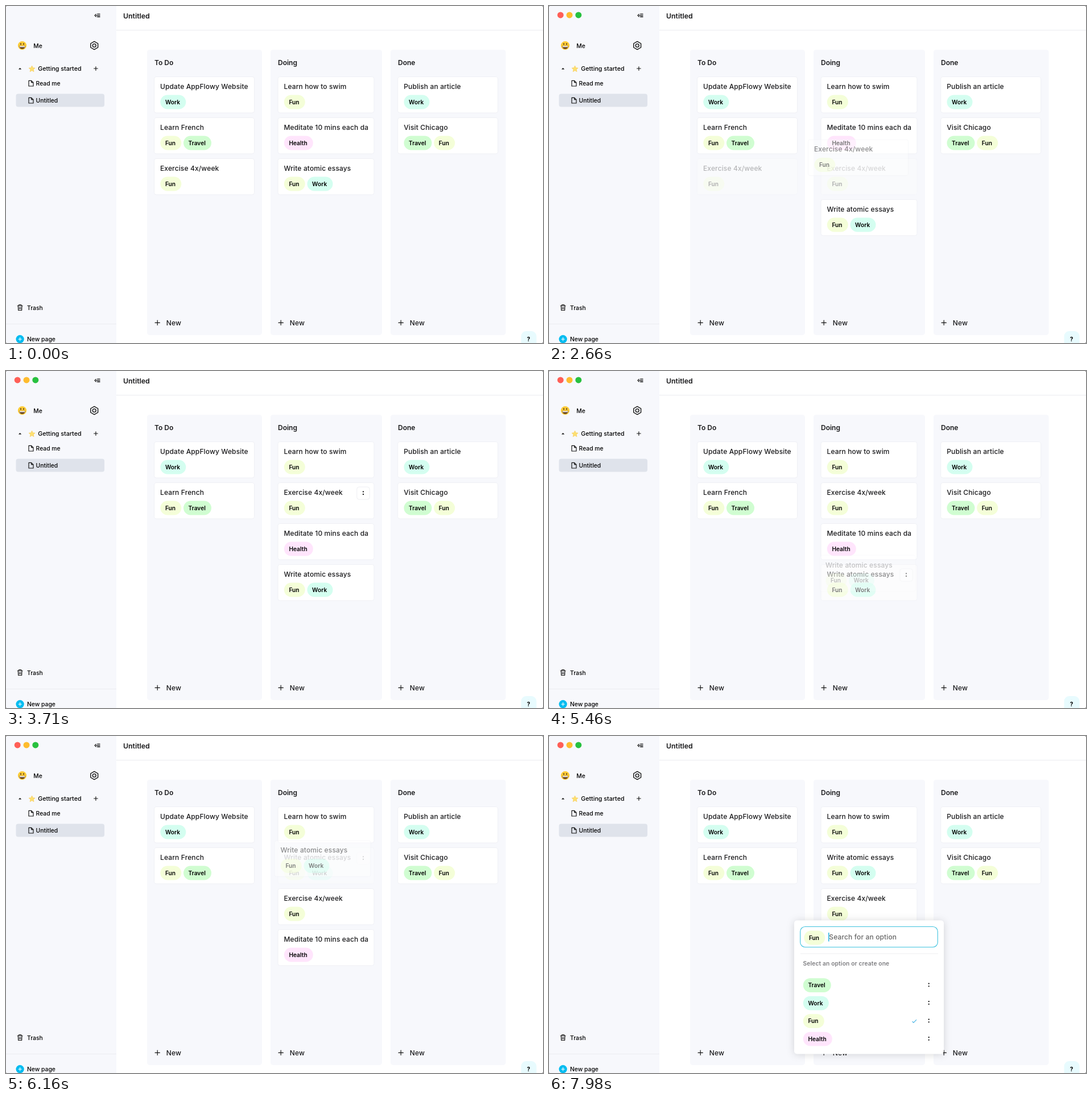
Animation of 944 by 593 pixels, one loop 8000 ms. Source, as an HTML page:

```html
<!DOCTYPE html>
<html lang="en">
<head>
<meta charset="utf-8">
<title>Board</title>
<style>
  html, body { margin: 0; width: 100%; height: 100%; overflow: hidden; background: #777; }
  svg { display: block; }
  text { font: 500 12px Inter, "Open Sans", sans-serif; letter-spacing: .13px; fill: #1a1a1c; white-space: pre; }
  .head { font-weight: 600; letter-spacing: 0; }
  .side { font-size: 10.35px; letter-spacing: 0; fill: #000; }
  .tag { font-size: 10.2px; font-weight: 600; letter-spacing: 0; fill: #000; }
  .line { fill: none; stroke: #111; stroke-width: 1.15; stroke-linecap: round; stroke-linejoin: round; }
  .popup { filter: drop-shadow(0 1px 7px rgba(0, 0, 0, .15)); }
</style>
</head>
<body>
<svg id="stage" width="944" height="593" viewBox="0 0 944 593">
  <rect width="944" height="593" rx="2.5" fill="#fff"/>
  <path d="M194 0H2.5A2.5 2.5 0 0 0 0 2.5V590.5A2.5 2.5 0 0 0 2.5 593H194Z" fill="#f7f8fc"/>
  <path d="M194 42.5H944M0 559.5H194" stroke="#ebecf0"/>

  <path class="line" style="stroke-width:1.3" d="M158.2 14.4L156 16.6L158.2 18.8M160.6 14.2H165M158.5 16.6H165M160.6 19H165"/>
  <circle cx="28.5" cy="69.5" r="7.6" fill="#fccb35"/>
  <path d="M23 70.3H34A5.5 5.3 0 0 1 23 70.3Z" fill="#5b3a1e"/>
  <path d="M23.7 70.5H33.3V72.4H23.7Z" fill="#fff"/>
  <ellipse cx="26" cy="66.8" rx="1" ry="1.6" fill="#5b3a1e"/>
  <ellipse cx="31" cy="66.8" rx="1" ry="1.6" fill="#5b3a1e"/>
  <path class="line" style="stroke-width:1.4" d="M155.2 62.4L161.6 66V73L155.2 76.6L148.8 73V66Z"/>
  <circle class="line" style="stroke-width:1.4" cx="155.2" cy="69.5" r="2.9"/>
  <path d="M22 111.4L24.6 108.8L27.2 111.4Z" fill="#111"/>
  <path id="star" fill="#fde070" stroke="#f7c648" stroke-width=".6" stroke-linejoin="round"/>
  <path class="line" d="M154.6 110H161.2M157.9 106.7V113.3"/>
  <rect x="17.5" y="154.5" width="155.5" height="23" rx="4" fill="#dfe3eb"/>
  <g class="line">
    <path id="doc" d="M44.6 131.3H40V141H48V134.6ZM44.6 131.3V134.6H48"/>
    <use href="#doc" y="30"/>
    <path d="M20.3 527.5H29M22.7 527.3V525.5H26.6V527.3M21.3 527.7L21.7 535.5H27.6L28 527.7M23.5 530V533.2M25.8 530V533.2"/>
  </g>
  <circle cx="24.6" cy="586.2" r="7.1" fill="#00bcf0"/>
  <path d="M21.4 586.2H27.8M24.6 583V589.4" stroke="#fff" stroke-width="1.1"/>

  <text class="head" x="206" y="22" style="font-size:12.3px">Untitled</text>
  <text class="side" x="48.3" y="73.7">Me</text>
  <text class="side" x="56.2" y="114.2" style="font-size:10.7px">Getting started</text>
  <text class="side" x="52.6" y="140.2">Read me</text>
  <text class="side" x="52.6" y="170.3">Untitled</text>
  <text class="side" x="37" y="534.8">Trash</text>
  <text class="side" x="37" y="590.4">New page</text>

  <rect x="905.5" y="572" width="27" height="30" rx="9" fill="#e8fbfe"/>
  <text class="tag" x="918.7" y="589.6" text-anchor="middle" style="font-weight:700">?</text>
  <g id="scene"></g>
</svg>
<script>
const $ = id => document.getElementById(id);
const STEP = 70, LOOP = 8000, SLOT = 72, TOP = 120.5;

const tags = {
  Travel: [49, '#d0fdd1'], Work: [45, '#d4fef0'],
  Fun: [37, '#f4fed8'], Health: [51, '#ffe5fc']
};
const cards = {
  site: ['Update AppFlowy Website', 'Work'],
  french: ['Learn French', 'Fun', 'Travel'],
  exercise: ['Exercise 4x/week', 'Fun'],
  swim: ['Learn how to swim', 'Fun'],
  meditate: ['Meditate 10 mins each day', 'Health'],
  essays: ['Write atomic essays', 'Fun', 'Work'],
  article: ['Publish an article', 'Work'],
  visit: ['Visit Chicago', 'Travel', 'Fun']
};
const columns = [['To Do', 248, 202, 260.5, 176], ['Doing', 465, 196, 478, 169], ['Done', 676, 202.5, 688.7, 176]];

// [time, card under the pointer, immediate]
const hovers = [
  [0, ''], [1400, 'exercise', true], [2100, '', true], [3640, 'exercise'], [4060, 'meditate'],
  [4480, 'essays'], [6650, 'exercise'], [7070, 'essays'], [7210, 'exercise'], [7910, '']
];
const exercisePath = [[2170, 260.5, 268.5], [2310, 268, 267], [2660, 455.5, 235], [3010, 460, 228], [3430, 460, 160]];
const essaysPath = [[5390, 478, 340.5], [5530, 473, 308], [5670, 465.5, 226], [5810, 466, 206], [6160, 472, 184]];

const ramp = (t, a, b) => Math.max(0, Math.min(1, (t - a) / (b - a)));
const fade = (t, at) => ramp(t, at - STEP, at + STEP);

function along(path, t) {
  let [, x, y] = path[0];
  for (let i = 1; i < path.length; i++) {
    const [t0, x0, y0] = path[i - 1], [t1, x1, y1] = path[i], k = ramp(t, t0, t1);
    if (t > t0) { x = x0 + (x1 - x0) * k; y = y0 + (y1 - y0) * k; }
  }
  return [x, y];
}

function menuAlpha(name, t) {
  const i = hovers.findLastIndex(h => h[0] <= t);
  const [at, now, immediate] = hovers[i];
  const k = immediate ? 1 : fade(t, at), before = i ? hovers[i - 1][1] : '';
  return (now === name) * k + (before === name) * (1 - k);
}

const dots = (x, y) => `<path d="M${x} ${y - 2.3}h0M${x} ${y + 2.3}h0" stroke="#111" stroke-width="2.3" stroke-linecap="round"/>`;

const pill = (name, x, y) => `<rect x="${x}" y="${y - 12.4}" width="${tags[name][0]}" height="24.8" rx="12.4" fill="${tags[name][1]}"/>
  <text class="tag" x="${x + 8.6}" y="${y + 3.7}">${name}</text>`;

function card(name, x, y, w, { alpha = 1, back = alpha, menu = 0 } = {}) {
  const [title, ...labels] = cards[name];
  let px = x + 10.8, pills = '';
  for (const label of labels) {
    pills += pill(label, px, y + 44.5);
    px += tags[label][0] + 3.7;
  }
  const button = menu ? `<g opacity="${menu}"><rect x="${x + w - 30.2}" y="${y + 7.5}" width="22.4" height="22" rx="4" fill="#fff" stroke="#eeeff3"/>${dots(x + w - 19, y + 18.2)}</g>` : '';
  return `<rect x="${x}" y="${y}" width="${w}" height="63.5" rx="3.5" fill="#fff" stroke="#eff0f5" opacity="${back}"/>
    <g opacity="${alpha}"><svg x="${x + 10.5}" y="${y}" width="${w - 21}" height="30"><text y="21.3">${title}</text></svg>${pills}${button}</g>`;
}

// items: [card, share of a full slot, opacity]; partial slots show the middle of their card, dimmed
function stack(items, x, w, t) {
  let y = TOP, out = '';
  for (const [name, size, full = 1] of items) {
    if (size <= 0 || full <= 0) continue;
    const h = SLOT * size, alpha = full * (.5 + .5 * size);
    const opts = { alpha, back: alpha * size, menu: x > 470 || t < 3640 ? menuAlpha(name, t) : 0 };
    out += `<svg x="0" y="${y}" width="944" height="${h}">${card(name, x, 4 + (h - SLOT) / 2, w, opts)}</svg>`;
    y += h;
  }
  return out;
}

function popup() {
  const rows = Object.keys(tags).map((name, i) => {
    const y = 438.6 + 31.5 * i;
    return pill(name, 446.8, y) + dots(667.7, y - .6);
  }).join('');
  return `<rect class="popup" x="431" y="324.5" width="263" height="235" rx="5" fill="#fff"/>
    <rect x="441.7" y="335.5" width="241.6" height="36" rx="8.5" fill="#fff" stroke="#3fc2de" stroke-width="1.1"/>
    ${pill('Fun', 448.3, 355)}
    <text x="492.3" y="357.9" style="fill:#666">Search for an option</text>
    <path d="M491.8 346V361.5" stroke="#00a9dc" stroke-width="1.3"/>
    <path d="M442 383H684" stroke="#eeeff1"/>
    <text x="446.5" y="404" style="font-size:10.25px;font-weight:600;fill:#7d7d80">Select an option or create one</text>
    ${rows}<path d="M638.6 502.2L640.9 504.4L646 499.2" fill="none" stroke="#4db6e6" stroke-width="1.2"/>`;
}

function scene(t) {
  const held1 = fade(t, 2240) - fade(t, 3640), held2 = fade(t, 5460) - fade(t, 6300);
  const ex = 1 - .7 * held1, es = 1 - .7 * held2;
  const enter = ramp(t, 2450, 2660), rise = ramp(t, 3150, 3360);
  const up1 = ramp(t, 5550, 5766), up2 = ramp(t, 5780, 5990);
  const lists = [
    [['site', 1], ['french', 1], ['exercise', 1, t < 3640 ? ex : t < 3710 ? .15 : 0]],
    [['swim', 1], ['essays', up2, es], ['exercise', rise, ex], ['essays', up1 - up2, es],
      ['meditate', 1], ['exercise', enter - rise, ex], ['essays', 1 - up1, es]],
    [['article', 1], ['visit', 1]]
  ];
  // the exercise card stays between the two essay slots
  let out = columns.map(([title, x, w, cx, cw], i) => `<rect x="${x}" y="77" width="${w}" height="502" rx="4.5" fill="#f7f8fc"/>
    <text class="head" x="${x + 13}" y="103.7">${title}</text>
    <path class="line" d="M${x + 14} 557.3h8.4m-4.2 -4.2v8.4"/>
    <text x="${x + 33.8}" y="562.3">New</text>${stack(lists[i], cx, cw, t)}`).join('');
  const ghost = (name, path, w, k) => k > 0 ? card(name, ...along(path, t), w, { alpha: .5 * k, back: .45 * k }) : '';
  out += ghost('exercise', exercisePath, 176, held1) + ghost('essays', essaysPath, 169, held2);
  if (t >= 1400) out += ['#ff5f57', '#febc2e', '#28c13f'].map((c, i) => `<circle cx="${20.2 + 15.8 * i}" cy="15.9" r="5.5" fill="${c}"/>`).join('');
  const shown = fade(t, 7910);
  return shown ? `${out}<g opacity="${shown}">${popup()}</g>` : out;
}

$('star').setAttribute('d', 'M' + Array.from({ length: 10 }, (_, i) => {
  const r = i % 2 ? 2.7 : 5.8, a = Math.PI * (i / 5 - .5);
  return [45.6 + r * Math.cos(a), 110.9 + r * Math.sin(a)].map(v => v.toFixed(2));
}).join('L') + 'Z');

let last = -1;
function frame() {
  const t = Math.floor(performance.now() % LOOP / STEP) * STEP;
  if (t !== last) $('scene').innerHTML = scene(last = t);
  requestAnimationFrame(frame);
}
frame();
</script>
</body>
</html>
```
